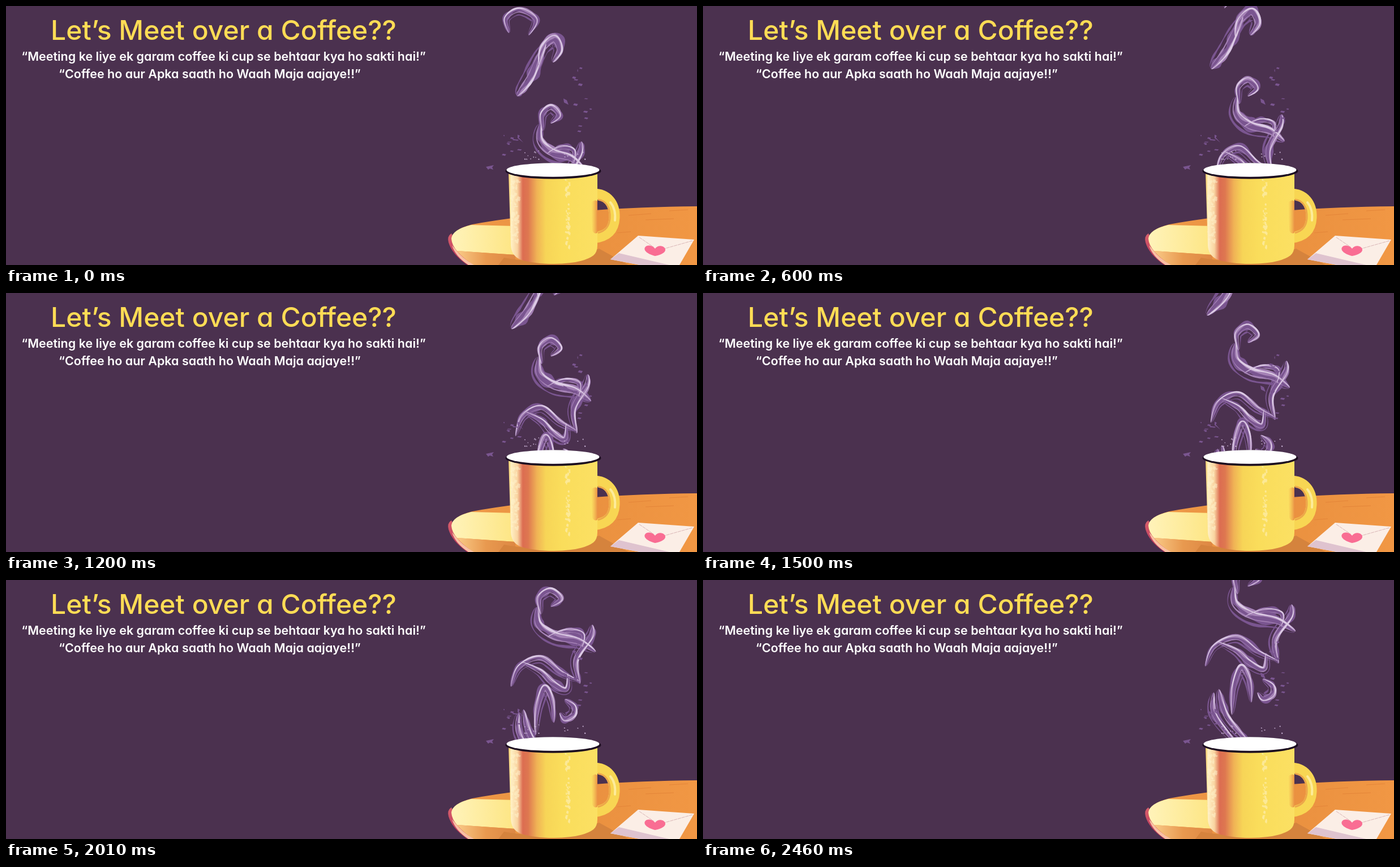
An HTML page that plays this animation: 1221x459 px, repeating every 2490 ms.

```html
<!DOCTYPE html>
<html lang="en">
<head>
<meta charset="utf-8">
<title>Coffee</title>
<style>
  html, body { margin: 0; width: 100%; height: 100%; overflow: hidden; background: #4b314f; }
  svg { display: block; width: 100vw; height: 100vh; }
  text {
    font-family: Inter, "Open Sans", sans-serif;
    font-feature-settings: "cv11";
    text-anchor: middle;
  }
  .title { font-size: 48px; font-weight: 500; fill: #ffdc55; }
  .line { font-size: 21.5px; font-weight: 600; fill: #fff; }
</style>
</head>
<body>
<svg viewBox="0 0 1221 459" preserveAspectRatio="none">
  <defs>
    <linearGradient id="body">
      <stop offset="0" stop-color="#f8cf63"/>
      <stop offset=".03" stop-color="#fff0c4"/>
      <stop offset=".1" stop-color="#f9d3a0"/>
      <stop offset=".16" stop-color="#dc6d51"/>
      <stop offset=".22" stop-color="#de7750"/>
      <stop offset=".32" stop-color="#f0b355"/>
      <stop offset=".42" stop-color="#f7d557"/>
      <stop offset=".6" stop-color="#fadd5b"/>
      <stop offset="1" stop-color="#fbe063"/>
    </linearGradient>
    <linearGradient id="wood">
      <stop offset="0" stop-color="#ef9a48"/>
      <stop offset=".5" stop-color="#e9903f"/>
      <stop offset="1" stop-color="#f19744"/>
    </linearGradient>
    <linearGradient id="light">
      <stop offset="0" stop-color="#fff3ba"/>
      <stop offset="1" stop-color="#fde583"/>
    </linearGradient>
    <linearGradient id="shade">
      <stop offset="0" stop-color="#f9c987"/>
      <stop offset=".5" stop-color="#e8994f"/>
      <stop offset="1" stop-color="#dd8743"/>
    </linearGradient>
    <linearGradient id="edge" x2="0" y2="1">
      <stop offset="0" stop-color="#d9606d"/>
      <stop offset="1" stop-color="#b52f57"/>
    </linearGradient>
    <linearGradient id="inner">
      <stop offset="0" stop-color="#f3b04c" stop-opacity="0"/>
      <stop offset="1" stop-color="#ea9145"/>
    </linearGradient>
    <clipPath id="air"><rect width="1221" height="288"/></clipPath>
  </defs>

  <rect width="1221" height="459" fill="#4b314f"/>

  <text class="title" x="384.5" y="60">Let’s Meet over a Coffee??</text>
  <text class="line" x="384.5" y="97">“Meeting ke liye ek garam coffee ki cup se behtaar kya ho sakti hai!”</text>
  <text class="line" x="360" y="128">“Coffee ho aur Apka saath ho Waah Maja aajaye!!”</text>

  <g id="smoke" clip-path="url(#air)">
    <path fill="#7a5590"/>
    <path fill="#a582b6"/>
    <path fill="#dccbe4"/>
  </g>

  <!-- loose flecks in the air -->
  <path d="M848 285l14-3-3 4 2 4-6-2-3 2zM985 164l6 3 3 8-8-4zM904 228l4 2-2 3 8 9-10-8z" fill="#7a5590"/>
  <path id="flecks" fill="#7a5590"/>
  <path id="sparks" fill="#cdb6d8"/>

  <!-- table -->
  <path d="M787 403Q779 408 782 419Q788 440 815 459H840L800 430Z" fill="url(#edge)"/>
  <path d="M1221 355Q1120 356 1040 362Q900 372 824 387Q789 396 787 412Q788 434 826 459H1221Z" fill="url(#wood)"/>
  <path d="M822 388Q789 396 787 412Q788 424 797 434L900 441V390Z" fill="url(#light)"/>
  <path d="M797 434L900 441V459H826Q808 447 797 434Z" fill="url(#shade)"/>
  <path d="M795 432Q806 447 827 459H817Q794 444 788 424Z" fill="#f9c0a4"/>
  <path d="M880 446Q960 462 1048 430L1100 459H870Z" fill="#d5833d"/>
  <path d="M1100 371l40-3M1130 379l50-2M1172 363l33-2M1080 402l24-2" stroke="#e48539" fill="none"/>

  <!-- letter -->
  <path d="M1117 407L1216 414L1190 459H1120L1068 449Z" fill="#fbeee6"/>
  <path d="M1068 449L1083 438L1172 459H1120Z" fill="#dfc3cf"/>
  <path d="M1119 410L1144 427M1160 431L1213 416" stroke="#d9b5b6" stroke-dasharray="6 1" fill="none"/>
  <path d="M1147 443C1135 440 1126 434 1129 428C1132 422 1143 424 1147 430C1151 423 1163 424 1165 431C1166 437 1157 441 1147 443Z" fill="#f96d93"/>

  <!-- mug -->
  <g fill="none">
    <path d="M1038 333C1062 333 1076 350 1075 375C1074 396 1064 408 1038 411" stroke="#f8d653" stroke-width="19"/>
    <path d="M1046 343C1060 345 1068 356 1067 376C1066 391 1059 399 1046 402" stroke="#eda64a" stroke-width="3"/>
    <path d="M1068 348Q1078 360 1076 380" stroke="#fdeb9b" stroke-width="4" stroke-linecap="round"/>
  </g>
  <path d="M888 296L892 424Q893 442 908 449Q932 457 968 457Q1020 456 1038 442Q1045 436 1045 424V296Z" fill="url(#body)"/>
  <path d="M1034 348Q1041 342 1045 346V402Q1039 405 1036 398Z" fill="url(#inner)"/>
  <path id="shine" fill="#fff5cf" opacity=".5"/>
  <ellipse cx="967" cy="292.5" rx="84.5" ry="14" fill="#1c0d20"/>
  <ellipse cx="966.5" cy="290.5" rx="82" ry="12.3" fill="#fff"/>
</svg>

<script>
const LOOP = 2490, STEP = 30;
const SPEED = .08;          // px per ms
const AXIS = 960, RIM = 270, SPREAD = .002;

// One tall column of curls: half width and spine of each.
// It rises out of the mug and widens on the way.
const column = [
  [7, "909,48 907,22 925,6 943,24 933,52"],
  [11, "948,104 951,74 965,56 974,78 966,100"],
  [11, "955,66 938,125 913,160"],
  [8, "948,222 946,193 961,178 973,194 960,208"],
  [12, "944,208 946,238 968,258 1000,268 1026,288"],
  [6, "958,262 982,250 1004,256 1006,280"],
  [8, "1014,240 1016,262 1000,304 1005,345"],
  [7, "900,350 918,314 950,298 978,324 1004,340"],
  [8, "922,306 948,322 964,342 984,354 988,326"],
  [8, "938,436 938,388 951,350 962,372 968,414"],
  [8, "982,372 998,384 1000,400 986,408 976,396"],
  [7, "908,396 910,436 945,490"],
  [8, "916,390 930,438 968,488"]
].map(([width, spine]) => ({
  width, points: samples(spine.split(" ").map(p => p.split(",").map(Number)))
}));

// Catmull-Rom samples along the spine
function samples(spine) {
  const n = spine.length - 1, fine = 12, out = [];
  const at = i => spine[Math.max(0, Math.min(n, i))];
  for (let k = 0; k <= n * fine; k++) {
    const i = Math.min(n - 1, Math.floor(k / fine)), f = k / fine - i;
    out.push([0, 1].map(c => {
      const [p, q, r, s] = [-1, 0, 1, 2].map(j => at(i + j)[c]);
      return q + f / 2 * (r - p + f * (2 * p - 5 * q + 4 * r - s + f * (3 * (q - r) + s - p)));
    }));
  }
  return out;
}

function rise([x, y0], t) {
  const y = y0 - SPEED * t;
  const sway = 2.5 * Math.sin(y / 25 + t / 350);
  return [AXIS + (x - AXIS) * (1 + SPREAD * (RIM - y)) + sway, y];
}

// Tapered outline; size and side are fractions of the half width
function outline(points, width, { size, side }, phase) {
  const left = [], right = [], end = points.length - 1;
  points.forEach(([x, y], i) => {
    const [x0, y0] = points[Math.max(0, i - 1)], [x1, y1] = points[Math.min(end, i + 1)];
    const len = Math.hypot(x1 - x0, y1 - y0) || 1;
    const nx = (y0 - y1) / len, ny = (x1 - x0) / len, u = i / end;
    const taper = width * Math.sin(Math.PI * u) ** .6;
    const ragged = .75 + .3 * Math.sin(u * 10 + phase) + .15 * Math.sin(u * 27 + phase * 2);
    const put = (list, d) => list.push((x + nx * taper * d).toFixed(1) + " " + (y + ny * taper * d).toFixed(1));
    put(left, side + size * ragged);
    put(right, side - size * ragged);
  });
  return "M" + left.concat(right.reverse()).join("L") + "Z";
}

const strands = [
  { tone: 0, size: 1, side: 0 },
  { tone: 0, size: .2, side: 1.4 },
  { tone: 1, size: .4, side: -.3 },
  { tone: 1, size: .12, side: .65 },
  { tone: 2, size: .18, side: -.35 }
];
const tones = document.querySelectorAll("#smoke path");

function draw(now) {
  const t = Math.floor(now % LOOP / STEP) * STEP;
  const d = ["", "", ""];
  column.forEach(({ width, points }, i) => {
    const risen = points.map(p => rise(p, t));
    strands.forEach((s, k) => d[s.tone] += outline(risen, width, s, i * 2 + k + t / 400));
  });
  tones.forEach((path, i) => path.setAttribute("d", d[i]));
}

let seed = 7;
const rnd = () => (seed = seed * 16807 % 2147483647) / 2147483647;

function specks(id, count, x, y, w, h, sx, sy) {
  const path = document.getElementById(id);
  let d = path.getAttribute("d") || "";
  for (let i = 0; i < count; i++) {
    const a = 1 + rnd() * sx, b = 1 + rnd() * sy;
    d += `M${x + rnd() * w} ${y + rnd() * h}l${a} ${b / 3}l${-a / 3} ${b}l${-a} ${-b / 2}z`;
  }
  path.setAttribute("d", d);
}
specks("flecks", 12, 1000, 70, 34, 200, 6, 3);
specks("flecks", 10, 874, 225, 36, 45, 6, 2);
specks("sparks", 14, 916, 255, 28, 17, 1, 1);
specks("sparks", 7, 975, 255, 48, 16, 1, 1);
specks("shine", 50, 988, 306, 7, 120, 3, 5);
specks("shine", 70, 891, 306, 14, 112, 4, 5);

const start = performance.now();
function tick() {
  draw(performance.now() - start);
  requestAnimationFrame(tick);
}
tick();
</script>
</body>
</html>
```
